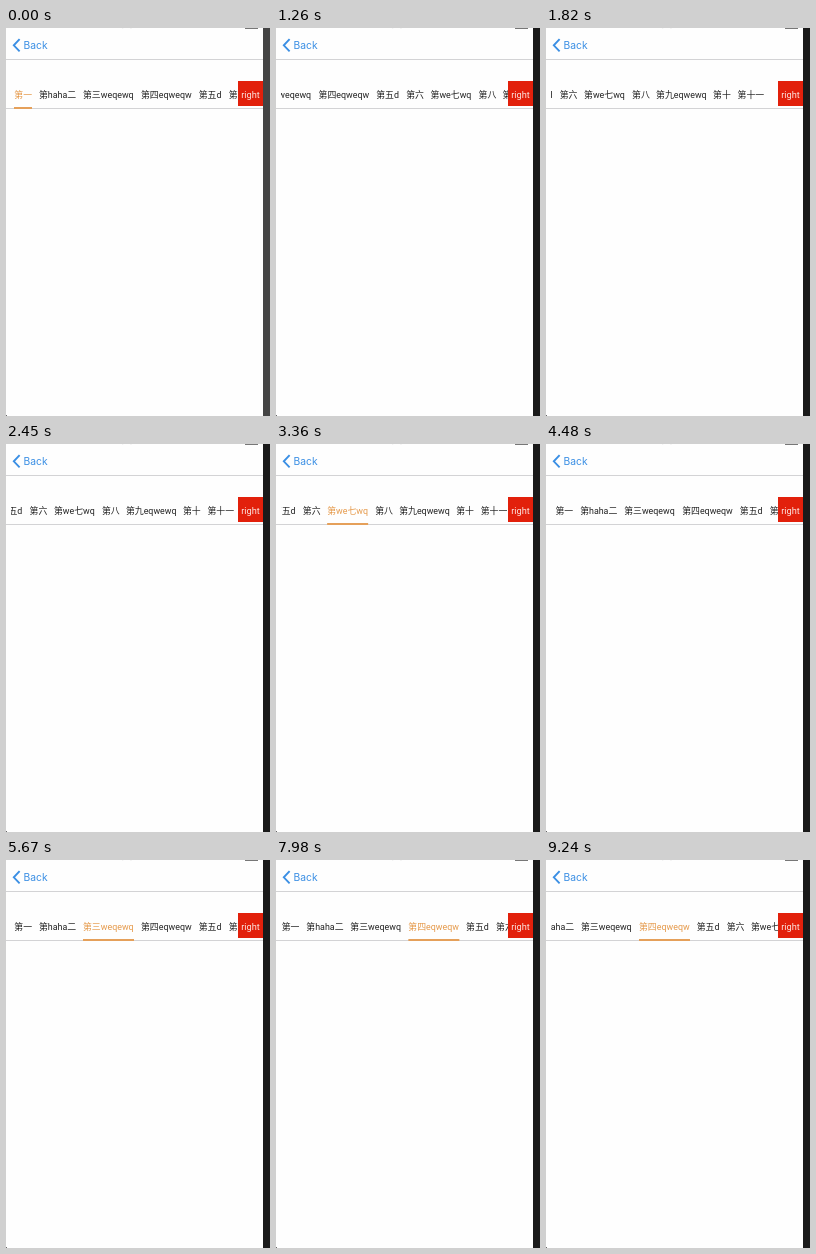
An HTML page for the animation above (9310 ms loop, 264x388 px).

```html
<!DOCTYPE html>
<html lang="zh-CN">
<head>
<meta charset="utf-8">
<title>Scrolling tabs</title>
<style>
  html, body { margin: 0; width: 100%; height: 100%; overflow: hidden; background: #fff; }
  #stage { position: relative; width: 264px; height: 388px; overflow: hidden; background: #fefefe;
    font: 8.9px Roboto, "Noto Sans CJK SC", "Noto Sans CJK", sans-serif; color: #222; white-space: nowrap; }
  #stage * { position: absolute; }
  .status { top: -8px; font-size: 8px; line-height: 10px; color: #444; }
  .battery { left: 239px; top: -5px; width: 13px; height: 6px; background: #777; }
  .rule { left: 0; width: 257px; height: 1px; background: #d3d3d5; }
  .back { left: 17.5px; top: 10px; font: 10.3px/15px Inter, sans-serif; color: #3b8fe4; }
  .chevron { left: 6px; top: 10px; }
  #strip { left: 5px; top: 53px; width: 227px; height: 28px; overflow: hidden; }
  #tabs { left: -5px; top: 0; }
  .tab { top: 0; height: 28px; line-height: 29px; }
  .tab.on { color: #e5994a; }
  .tab.on::after { content: ""; position: absolute; left: 0; right: 0; top: 26px; height: 2px; background: #e5a05a; }
  .right { left: 232px; top: 53px; width: 25px; height: 25px; background: #e2200b; color: #fbe4e0;
    font-size: 9.2px; line-height: 27px; text-align: center; }
  #edge { left: 257px; top: 0; width: 7px; height: 388px; }
  .corner { left: 0; top: 387px; width: 1px; height: 1px; background: #666; }
</style>
</head>
<body>
<div id="stage">
  <span class="status" style="left:3px">Carrier</span>
  <span class="status" style="left:113px">下午5:07</span>
  <div class="battery"></div>
  <svg class="chevron" width="10" height="15"><path d="M7.6 1.2 1.8 7.3 7.6 13.4" fill="none" stroke="#3b8fe4" stroke-width="1.9"/></svg>
  <span class="back">Back</span>
  <div class="rule" style="top:31px"></div>
  <div class="rule" style="top:80px"></div>
  <div id="strip"><div id="tabs"></div></div>
  <div class="right">right</div>
  <div id="edge"></div>
  <div class="corner"></div>
</div>
<script>
const LOOP = 9310, STEP = 70;
const tabsBox = document.getElementById('tabs');
const edge = document.getElementById('edge');

const labels = ['第一', '第haha二', '第三weqewq', '第四eqweqw', '第五d', '第六',
  '第we七wq', '第八', '第九eqwewq', '第十', '第十一'];
const lefts = [8.3, 33, 77, 135, 192.7, 222.7, 247, 295, 319, 376, 400.5];
const tabs = labels.map((label, i) => {
  const tab = document.createElement('span');
  tab.textContent = label;
  tab.style.left = lefts[i] + 'px';
  return tabsBox.appendChild(tab);
});

const glide = u => (1 - Math.cos(Math.PI * u)) / 2;
const flick = u => Math.sin(Math.PI * u / 2);
const settle = u => 1 - (1 - u) ** 3;

// start, end, scroll offset at the end, easing
const moves = [
  [1000, 1900, 211, flick],
  [1900, 2590, 199, settle],
  [3310, 3620, 149, glide],
  [3640, 3780, 137, glide],
  [3850, 4106, -10, flick],
  [4106, 4830, 0, settle],
  [7930, 8240, 42, glide]
];
// time, index of the selected tab
const taps = [[0, 0], [2730, 8], [3360, 6], [5670, 2], [6230, 1], [6860, 0], [7980, 3]];

function scrollAt(t) {
  let x = 0;
  for (const [start, end, to, ease] of moves) {
    if (t < start) break;
    x += (to - x) * ease(Math.min(1, (t - start) / (end - start)));
  }
  return x;
}

function draw(now) {
  const t = Math.floor(now % LOOP / STEP) * STEP;
  const selected = taps.filter(([time]) => time <= t).pop()[1];
  tabs.forEach((tab, i) => { tab.className = i === selected ? 'tab on' : 'tab'; });
  tabsBox.style.transform = `translateX(${-scrollAt(t)}px)`;
  edge.style.background = t < 1050 ? '#444' : '#1a1a1a';
}

const begin = performance.now();
function tick() {
  draw(performance.now() - begin);
  requestAnimationFrame(tick);
}
tick();
</script>
</body>
</html>
```
